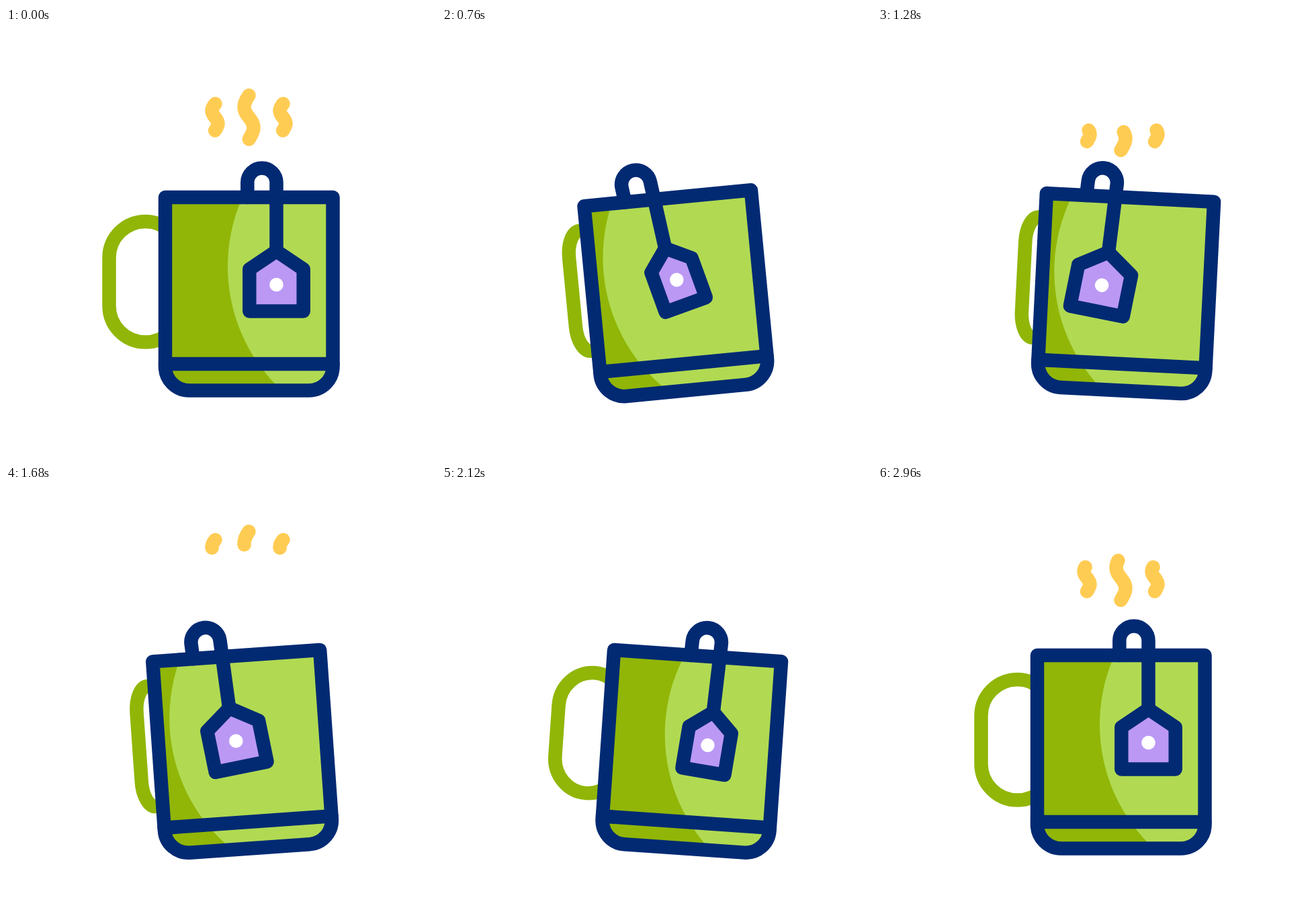
Write an HTML page that moves like this. It is 640 px wide and 640 px high and loops after 3 s.

```html
<!DOCTYPE html>
<html lang="en">
<head>
<meta charset="utf-8">
<title>Tea mug</title>
<style>
  html, body { margin: 0; width: 100%; height: 100%; overflow: hidden; background: #fff; }
  svg { display: block; width: 100vw; height: 100vh; }
  .line { fill: none; stroke: #022a73; stroke-width: 20.5; stroke-linecap: round; stroke-linejoin: round; }
  #handle { fill: none; stroke: #91b607; stroke-width: 20.5; }
  #steam { fill: none; stroke: #ffcc53; stroke-width: 20.5; stroke-linecap: round; }
</style>
</head>
<body>
<svg viewBox="0 0 640 640">
  <defs>
    <path id="body" d="M237 252H486.5V504a35.5 35.5 0 0 1-35.5 35.5H272.5a35.5 35.5 0 0 1-35.5-35.5Z"/>
    <clipPath id="inside"><use href="#body"/></clipPath>
  </defs>
  <g id="steam">
    <path id="wisp" pathLength="1" d="M311.5 113C308.5 116.5 306.5 119.5 306.5 123.5C306.5 131.5 315.5 134.5 315.5 142.5C315.5 146 313.5 149 311 153"/>
    <path pathLength="1" d="M361.5 100.5C357 107 354.5 112 354.5 118C354.5 131 368.5 135 368.5 149C368.5 155 365 160 361.5 166"/>
    <use href="#wisp" x="101"/>
  </g>
  <g id="mug">
    <rect id="handle" y="288" height="179.5"/>
    <use href="#body" fill="#91b607"/>
    <g clip-path="url(#inside)"><circle id="light" cy="355" r="252" fill="#b1da52"/></g>
    <use href="#body" class="line"/>
    <path class="line" d="M237 500H486.5"/>
    <g id="string">
      <path class="line" d="M359.3 252V230a21.6 21.6 0 0 1 43.2 0V332"/>
      <g id="tag">
        <path id="paper" fill="#bb98f4"/>
        <circle cx="402.5" cy="382" r="10.3" fill="#fff"/>
        <path id="edge" class="line"/>
      </g>
    </g>
  </g>
</svg>
<script>
  const LOOP = 3000, PUFF = 1500, BEAT = 510, FIRST = 630, LAG = 90;

  function set(id, attrs) {
    const node = document.getElementById(id);
    for (const name in attrs) node.setAttribute(name, attrs[name]);
  }

  // Eased rise from 0 to 1 between two times
  function ramp(t, from, to) {
    const u = Math.min(1, Math.max(0, (t - from) / (to - from)));
    return u * u * (3 - 2 * u);
  }

  // Rocking: one big lean, three smaller ones on the beat, then rest
  function tilt(t) {
    let angle = -7.45 * ramp(t, 230, FIRST);
    [4.5, -4.1, 4.1].forEach((top, i) => {
      const begin = FIRST + BEAT * i;
      angle += (top - angle) * ramp(t, begin, begin + BEAT);
    });
    return angle * (1 - ramp(t, FIRST + 3 * BEAT, 2770));
  }

  // Turning to the side and back
  const turn = t => ramp(t, 0, 850) - ramp(t, 1630, 2260);

  // The tag shows its narrow side during each turn
  const narrow = t => ramp(t, 0, 440) - ramp(t, 440, 960) + ramp(t, 1650, 1900) - ramp(t, 1900, 2260);

  function drawHandle(p) {
    const k = 1 - .665 * p;
    set('handle', { x: 237 - 83.5 * k, width: 108 * k, rx: 54 * k, ry: 54 - 16 * p });
  }

  function drawTag(w) {
    const half = 40.2 * w;
    const d = `M402.5 332L${402.5 + half} 359V421.5H${402.5 - half}V359Z`;
    set('paper', { d });
    set('edge', { d });
  }

  // Each puff grows from its lower end, then shrinks into its upper end.
  function drawSteam(t) {
    const p = (t + 400) % PUFF - 400;
    const grown = Math.min(1, Math.max(0, 1 + p / 367));
    const left = Math.min(1, Math.max(0, 1 - p / 395)) ** 2;
    const begin = Math.min(.999, 1 - grown);
    set('steam', {
      visibility: p >= -385 && p <= 510 ? 'visible' : 'hidden',
      transform: `translate(0 ${19 * (1 - grown * grown) - 46.5 * (1 - left)})`,
      'stroke-dasharray': `${Math.max(.001, left - begin)} 2`,
      'stroke-dashoffset': -begin
    });
  }

  function draw(t) {
    const p = turn(t), swing = tilt(t - LAG);
    set('mug', { transform: `rotate(${tilt(t)} 361.7 524)` });
    set('light', { cx: 582 - 76 * p });
    set('string', { transform: `translate(${-63 * p} 0) rotate(${swing} 359 252)` });
    set('tag', { transform: `rotate(${swing} 402.5 332)` });
    drawHandle(p);
    drawTag(1 - .62 * narrow(t));
    drawSteam(t);
  }

  const start = performance.now();
  function tick() {
    draw((performance.now() - start) % LOOP);
    requestAnimationFrame(tick);
  }
  tick();
</script>
</body>
</html>
```
